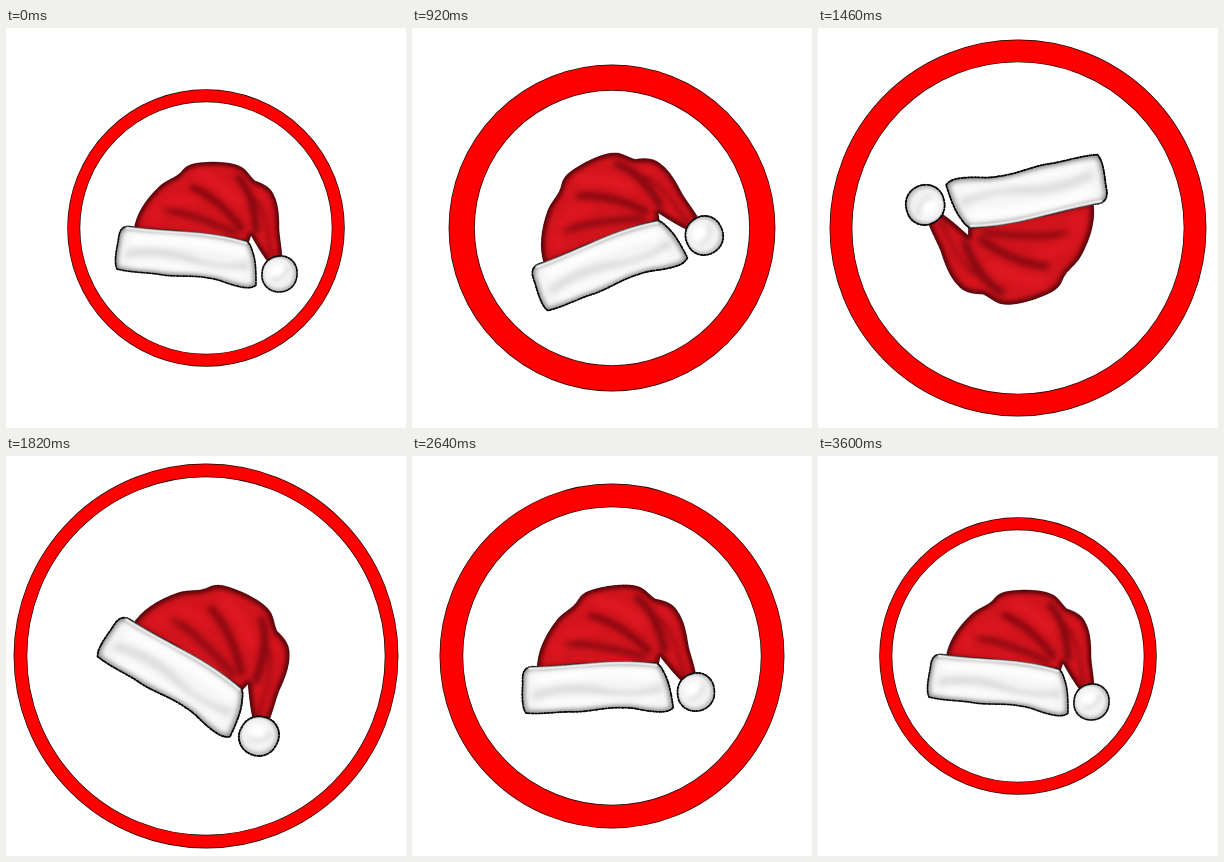
These frames come from a looping animation (400 px wide and 400 px high, 3700 ms). An HTML page with a canvas:

```html
<!DOCTYPE html>
<html lang="en">
<head>
<meta charset="utf-8">
<title>Santa hat</title>
<style>
  html, body { margin: 0; width: 100%; height: 100%; overflow: hidden; background: #fff; }
  canvas { display: block; width: 400px; height: 400px; }
</style>
</head>
<body>
<canvas id="stage" width="400" height="400"></canvas>
<script>
const ctx = document.getElementById('stage').getContext('2d');
const LOOP = 3700, MOVE = 3600, STEP = 20;

// Smooth curve through [time, value] points that never overshoots them.
function curve(points) {
  const last = points.length - 1;
  const rise = i => (points[i + 1][1] - points[i][1]) / (points[i + 1][0] - points[i][0]);
  const slopes = points.map((_, i) => {
    if (i === 0 || i === last) return 0;
    const a = rise(i - 1), b = rise(i);
    return a * b <= 0 ? 0 : 2 * a * b / (a + b);
  });
  return t => {
    let i = 0;
    while (i < last - 1 && t > points[i + 1][0]) i++;
    const [t0, v0] = points[i], [t1, v1] = points[i + 1];
    const h = t1 - t0, s = (t - t0) / h, s2 = s * s, s3 = s2 * s;
    return v0 * (2 * s3 - 3 * s2 + 1) + v1 * (3 * s2 - 2 * s3)
      + h * (slopes[i] * (s3 - 2 * s2 + s) + slopes[i + 1] * (s3 - s2));
  };
}

const outerRadius = curve([[0, 138.5], [540, 142.5], [640, 144.7], [1080, 175], [1180, 180.5],
  [1620, 190.7], [1880, 192.3], [2160, 190.3], [2320, 185.5], [2700, 169.5],
  [2960, 156.7], [3240, 145], [3600, 138.5]]);
const innerRadius = curve([[0, 126], [640, 127.2], [1180, 152], [1820, 179], [1880, 179.5],
  [2320, 169.5], [2960, 131.5], [3600, 126]]);
const hatAngle = curve([[0, 0], [640, 1], [1180, -82], [1820, -335.5], [2320, -363.4],
  [2960, -371], [3600, -360]]);
const hatScale = curve([[0, 1], [640, 1.032], [1180, 1.095], [1820, 1.107], [2320, 1.087],
  [2960, 1.022], [3600, 1]]);

const body = new Path2D(`M128 202 C130 187 139 172 154 158 C162 151 171 150 177 142
  C184 134 195 135 205 134 C216 134 228 135 235 139 C241 142 244 149 249 153
  C258 156 265 160 268 168 C273 178 273 192 273 202 C274 214 276 222 276 232
  L262 234 C256 226 250 216 245 207 L242 216 C210 211 160 206 128 202 Z`);
const brim = new Path2D(`M117 200 C121 197 126 199 132 200 C148 202 165 202 180 204
  C202 205 222 209 239 213 C244 214 245 219 247 225 C250 234 250 246 250 257
  C246 261 238 260 231 258 C221 256 213 251 202 250 C188 247 170 249 157 247
  C141 244 126 245 111 241 C108 235 110 224 112 214 C113 208 113 203 117 200 Z`);
const pom = new Path2D('M273 228 C284 227 292 236 291 246 C291 257 283 264 273 264 C263 264 255 256 256 246 C256 236 263 229 273 228 Z');

function brush(g, color, width, blur, path) {
  g.filter = blur ? `blur(${blur}px)` : 'none';
  g.strokeStyle = color;
  g.lineWidth = width;
  g.stroke(typeof path === 'string' ? new Path2D(path) : path);
  g.filter = 'none';
}

function shape(g, path, fill, paint) {
  g.save();
  g.clip(path);
  g.fillStyle = fill;
  g.fillRect(0, 0, 400, 400);
  paint();
  g.restore();
}

function furEdge(g, path) {
  brush(g, 'rgba(40,40,40,.7)', 0.9, 0, path);
  g.setLineDash([2, 1.7, 1, 1.4]);
  brush(g, '#080808', 1.7, 0, path);
  g.setLineDash([]);
}

function paintHat() {
  const sheet = document.createElement('canvas');
  sheet.width = sheet.height = 800;
  const g = sheet.getContext('2d');
  g.scale(2, 2);
  g.lineCap = g.lineJoin = 'round';

  shape(g, body, '#d2141d', () => {
    brush(g, 'rgba(65,0,5,.85)', 6, 4, body);
    brush(g, 'rgba(95,0,8,.65)', 7, 6, 'M187 160 Q211 169 235 200');
    brush(g, 'rgba(85,0,8,.55)', 6, 6, 'M158 181 Q190 187 229 205');
    brush(g, 'rgba(70,0,8,.65)', 6, 6, 'M232 149 Q248 166 250 202');
    brush(g, 'rgba(90,0,8,.5)', 5, 6, 'M250 172 Q266 190 265 226');
    brush(g, 'rgba(235,30,38,.65)', 9, 8, 'M195 147 Q217 155 232 174');
    brush(g, 'rgba(232,25,34,.6)', 10, 8, 'M148 190 Q163 164 188 173');
    brush(g, 'rgba(225,22,30,.6)', 5, 5, 'M253 165 Q263 184 268 220');
  });
  brush(g, 'rgba(45,0,5,.6)', 0.8, 0, body);

  shape(g, brim, '#f5f5f5', () => {
    brush(g, 'rgba(65,65,65,.65)', 5, 5, brim);
    brush(g, 'rgba(140,140,140,.35)', 5, 7, 'M122 226 Q157 220 186 232 T241 237');
    brush(g, 'rgba(255,255,255,.9)', 9, 7, 'M128 211 Q174 209 235 224');
    brush(g, 'rgba(255,255,255,.6)', 7, 6, 'M129 235 Q179 238 234 246');
  });
  furEdge(g, brim);
  brush(g, '#eeeeee', 2.6, 0.8, 'M121 200 Q146 203 180 205 T240 215');

  const fluff = g.createRadialGradient(271, 243, 4, 273, 246, 19);
  fluff.addColorStop(0, '#ffffff');
  fluff.addColorStop(0.65, '#efefef');
  fluff.addColorStop(1, '#a2a2a2');
  shape(g, pom, fluff, () => brush(g, 'rgba(150,150,150,.3)', 3, 5, 'M267 251 Q277 252 282 240'));
  furEdge(g, pom);
  return sheet;
}

function drawRing(outer, inner) {
  ctx.beginPath();
  ctx.arc(200, 200, (outer + inner) / 2, 0, Math.PI * 2);
  ctx.strokeStyle = '#200000';
  ctx.lineWidth = outer - inner + 0.5;
  ctx.stroke();
  ctx.strokeStyle = '#ff0000';
  ctx.lineWidth = outer - inner - 0.9;
  ctx.stroke();
}

const hat = paintHat();

function draw(t) {
  ctx.fillStyle = '#fff';
  ctx.fillRect(0, 0, 400, 400);
  drawRing(outerRadius(t), innerRadius(t));
  ctx.save();
  ctx.translate(200, 200);
  ctx.rotate(hatAngle(t) * Math.PI / 180);
  ctx.scale(hatScale(t), hatScale(t));
  ctx.drawImage(hat, -200, -200, 400, 400);
  ctx.restore();
}

const start = performance.now();
function tick() {
  const t = (performance.now() - start) % LOOP;
  draw(Math.min(Math.floor(t / STEP) * STEP, MOVE));
  requestAnimationFrame(tick);
}
tick();
</script>
</body>
</html>
```
